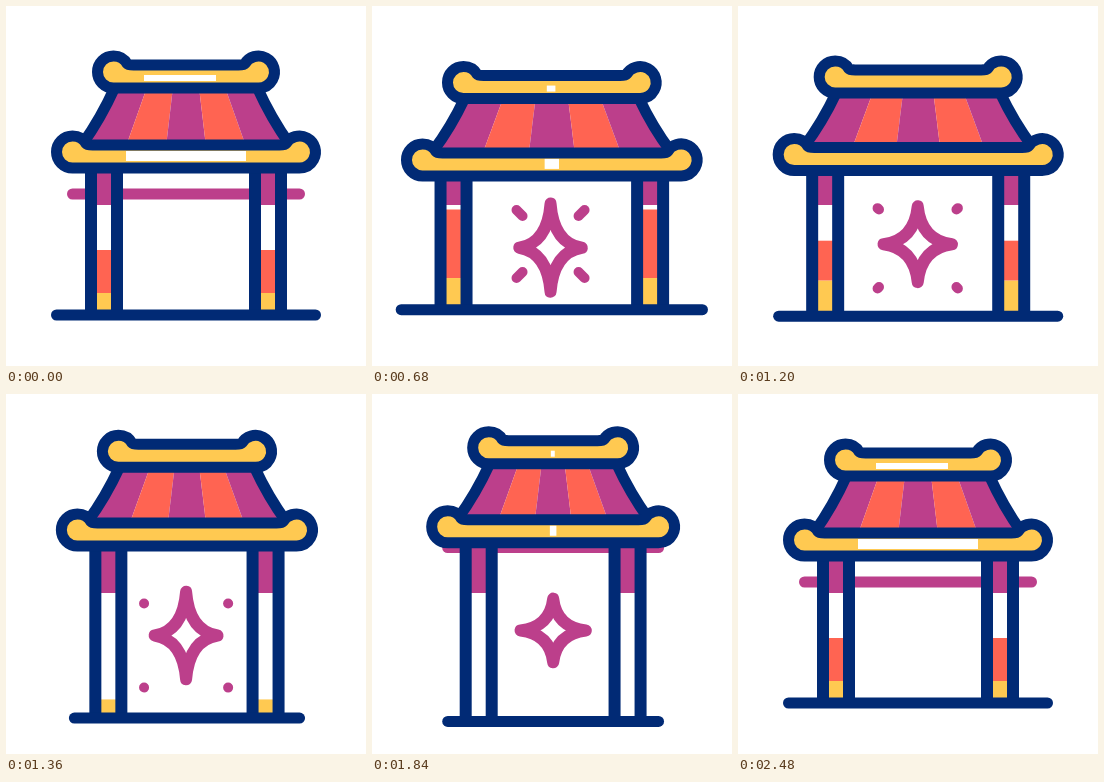
These frames come from a looping animation (360 by 360 pixels, 2600 ms). An HTML page with a canvas:

```html
<!DOCTYPE html>
<html lang="en">
<head>
<meta charset="utf-8">
<title>Temple gate</title>
<style>
  html, body { margin: 0; width: 100%; height: 100%; overflow: hidden; background: #fff; }
  canvas { display: block; width: 360px; height: 360px; }
</style>
</head>
<body>
<canvas id="stage" width="360" height="360"></canvas>
<script>
const ctx = document.getElementById('stage').getContext('2d');
const LOOP = 2600;
const NAVY = '#012a75', PURPLE = '#bc3f8b', ORANGE = '#ff6452', YELLOW = '#ffc951', WHITE = '#fff';

// half: top beam half width; post: offset of the outer post lines;
// base: yellow height; gapEnd: lower end of the white post gap; shine: beam gap half width
const REST = { cx: 180, topY: 66, half: 72.5, lowY: 146, ground: 309, groundHalf: 129.5,
  post: 95, barY: 188, base: 22, gapEnd: 244, shine: 60 };
const WIDE = { cx: 179.8, topY: 78, half: 90.5, lowY: 155, ground: 303, groundHalf: 153.5,
  post: 113.5, barY: 151, base: 33, gapEnd: 198, shine: 0 };
const TALL = { cx: 181.2, topY: 53, half: 64, lowY: 132, ground: 328.5, groundHalf: 104,
  post: 87, barY: 151.5, base: 42, gapEnd: 328, shine: 0 };

const progress = (t, from, to) => Math.min(1, Math.max(0, (t - from) / (to - from)));
const cubic = p => p < .5 ? 4 * p ** 3 : 1 - 4 * (1 - p) ** 3;
const smooth = p => p * p * (3 - 2 * p);
const easeOut = p => 1 - (1 - p) ** 2;

function mix(a, b, p) {
  const pose = {};
  for (const key in a) pose[key] = a[key] + (b[key] - a[key]) * p;
  return pose;
}

function poseAt(t) {
  if (t < 920) return mix(REST, WIDE, cubic(progress(t, 150, 920)));
  if (t < 1650) return mix(WIDE, TALL, cubic(progress(t, 920, 1600)));
  return mix(TALL, REST, cubic(progress(t, 1650, 2450)));
}

function stroke(color, width, cap = 'butt') {
  ctx.strokeStyle = color;
  ctx.lineWidth = width;
  ctx.lineCap = cap;
  ctx.lineJoin = 'round';
  ctx.stroke();
}

function line(x1, y1, x2, y2, color, width, cap = 'round') {
  ctx.beginPath();
  ctx.moveTo(x1, y1);
  ctx.lineTo(x2, y2);
  stroke(color, width, cap);
}

function rect(x1, y1, x2, y2, color) {
  ctx.fillStyle = color;
  ctx.fillRect(x1, y1, x2 - x1, Math.max(0, y2 - y1));
}

function beam(cx, y, half) {
  const r = 10.5, x1 = cx - half, x2 = cx + half, top = y - 1.5;
  ctx.beginPath();
  ctx.arc(x1, y, r, Math.PI / 2, 2 * Math.PI - .5);
  ctx.quadraticCurveTo(x1 + 12, top, x1 + 20, top);
  ctx.lineTo(x2 - 20, top);
  ctx.quadraticCurveTo(x2 - 12, top, x2 - r * Math.cos(.5), y - r * Math.sin(.5));
  ctx.arc(x2, y, r, Math.PI + .5, 2.5 * Math.PI);
  ctx.closePath();
  stroke(NAVY, 22);
  ctx.fillStyle = YELLOW;
  ctx.fill();
}

function roof({ cx, topY, half, lowY }) {
  const y1 = topY + 16, y2 = lowY - 8, midY = (y1 + y2) / 2 + 2;
  const a = half - 7, b = half + 26;
  for (let i = 0; i < 5; i++) {
    const at = (w, n) => cx + w * (n * .4 - 1);
    ctx.fillStyle = i % 2 ? ORANGE : PURPLE;
    ctx.beginPath();
    ctx.moveTo(at(a, i), y1);
    ctx.lineTo(at(a, i + 1), y1);
    ctx.lineTo(at(b, i + 1), y2);
    ctx.lineTo(at(b, i), y2);
    ctx.fill();
  }
  for (const s of [-1, 1]) {
    ctx.beginPath();
    ctx.moveTo(cx + s * (a + 6), y1);
    ctx.quadraticCurveTo(cx + s * ((a + b) / 2 + 3), midY, cx + s * (b + 5), y2);
    stroke(NAVY, 11);
  }
}

function post({ cx, post, lowY, ground, base, gapEnd }, side) {
  const x = cx + side * (post - 13), purpleEnd = 199;
  rect(x - 12, lowY, x + 12, purpleEnd, PURPLE);
  rect(x - 12, purpleEnd, x + 12, ground - base, ORANGE);
  rect(x - 12, ground - base, x + 12, ground, YELLOW);
  rect(x - 12, purpleEnd, x + 12, gapEnd, WHITE);
  for (const edge of [x - 13, x + 13]) line(edge, lowY, edge, ground, NAVY, 12, 'butt');
}

function star(t, x) {
  const pulse = Math.cos(2 * Math.PI * (t - 680) / 720);
  const out = 1 - smooth(progress(t, 1750, 2300));
  const spread = easeOut(progress(t, 200, 520));
  const w = (39.8 - 2.5 * pulse) * spread * out;
  const h = (44.8 + 5.3 * pulse) * easeOut(progress(t, 200, 350)) * out;
  const y = 238.7 + 3 * pulse + 35 * (1 - spread);
  if (w < .5) return;
  const width = Math.min(12, w / 2), a = w - width / 2, b = h - width / 2, k = .1;
  ctx.beginPath();
  ctx.moveTo(x, y - b);
  ctx.quadraticCurveTo(x + a * k, y - b * k, x + a, y);
  ctx.quadraticCurveTo(x + a * k, y + b * k, x, y + b);
  ctx.quadraticCurveTo(x - a * k, y + b * k, x - a, y);
  ctx.quadraticCurveTo(x - a * k, y - b * k, x, y - b);
  ctx.closePath();
  stroke(PURPLE, width);
}

// Four dashes fly outwards and shrink to dots
function rays(t, x, y) {
  const width = 10 * smooth(progress(t, 460, 640)) * (1 - smooth(progress(t, 1370, 1520)));
  if (width < .2) return;
  const distance = 31 + (t - 680) * .0162;
  const length = 3 * (1 - progress(t, 680, 1360)) + .01;
  const a = distance - length, b = distance + length;
  for (const sx of [-1, 1])
    for (const sy of [-1, 1])
      line(x + sx * a, y + sy * a, x + sx * b, y + sy * b, PURPLE, width);
}

function draw(t) {
  const p = poseAt(t), { cx, topY, lowY, half, ground, groundHalf, barY, shine } = p;
  const lowHalf = half + 41, drift = 177 + t / 440;
  rect(0, 0, 360, 360, WHITE);
  line(cx - lowHalf, barY, cx + lowHalf, barY, PURPLE, 11);
  star(t, drift);
  rays(t, drift, ground * 2 / 3 + 35.5);
  post(p, -1);
  post(p, 1);
  line(cx - groundHalf, ground, cx + groundHalf, ground, NAVY, 11);
  roof(p);
  beam(cx, topY, half);
  beam(cx, lowY, lowHalf);
  rect(cx - shine * .7, topY + 3, cx + shine * .5, topY + 9, WHITE);
  rect(cx - shine, lowY - 1, cx + shine, lowY + 9, WHITE);
}

const start = performance.now();
function tick() {
  draw((performance.now() - start) % LOOP);
  requestAnimationFrame(tick);
}
tick();
</script>
</body>
</html>
```
